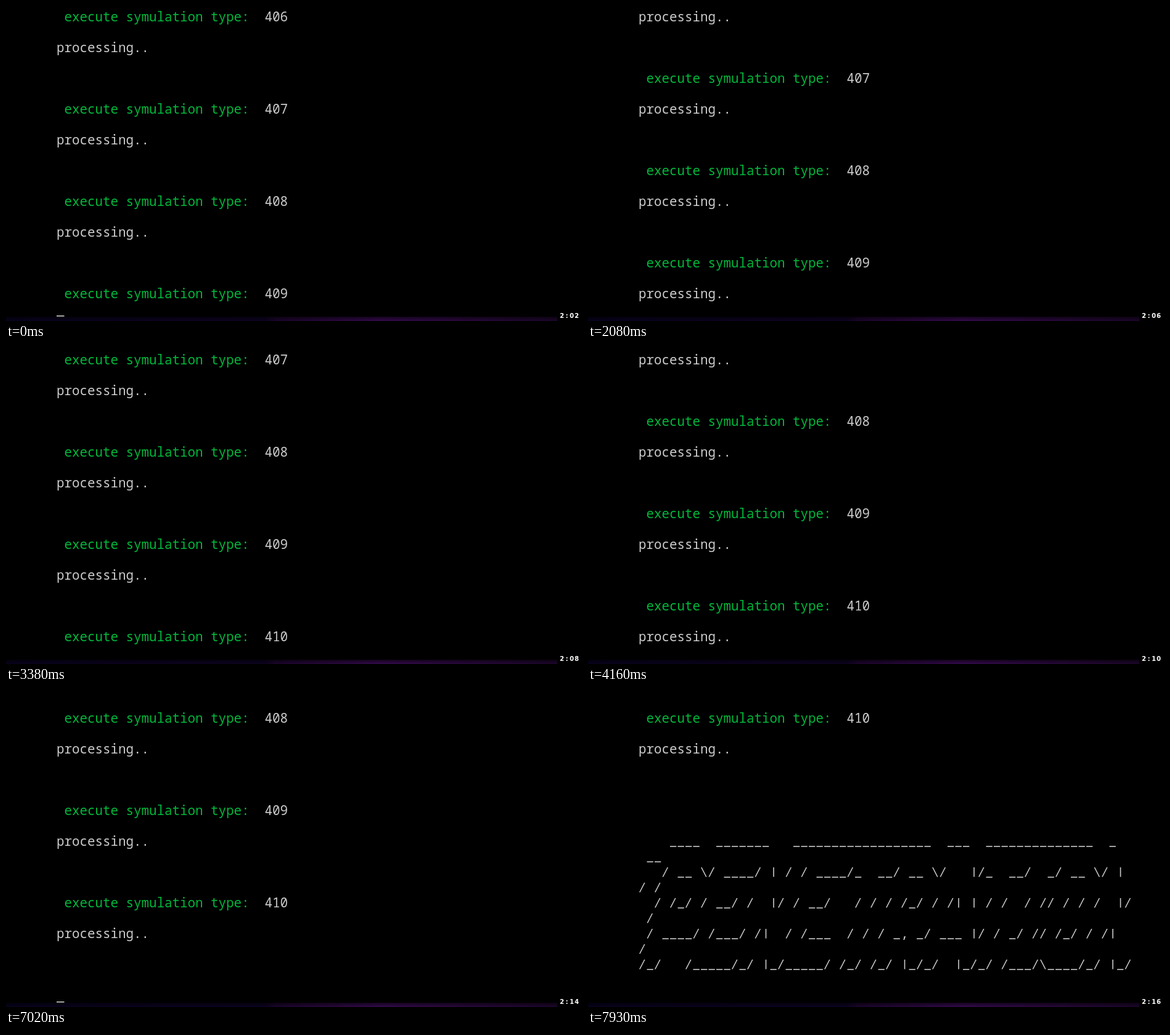
These frames come from a looping animation (934x512 px, 8000 ms). An HTML page with a canvas:

```html
<!DOCTYPE html>
<html lang="en">
<head>
<meta charset="utf-8">
<title>Terminal simulation log</title>
<style>
  html, body { margin: 0; width: 100%; height: 100%; overflow: hidden; background: #000; }
  canvas { display: block; }
</style>
</head>
<body>
<canvas id="stage" width="934" height="512"></canvas>
<script>
const ctx = document.getElementById('stage').getContext('2d');

const LOOP = 8000, STEP = 130;
const LEFT = 82, CELL = 12.5, ROW = 25, COLS = 64, LAST_ROW = 18;
const GRAY = '#cccccc', GREEN = '#00b83c';
const TERM_FONT = '300 20.83px "Noto Sans Mono", "DejaVu Sans Mono", monospace';
const CLOCK_FONT = 'bold 10px "DejaVu Sans", sans-serif';

// [time in ms, lines scrolled so far]
const SCROLLS = [[0, 0], [520, 2], [3120, 6], [3900, 8], [6630, 11], [7540, 23]];
const FIRST_TYPE = 405, LAST_TYPE = 410;
const BANNER_ROW = 32;

const BANNER = [
  String.raw`    ____  _______   __________________  ___  ______________  _   __`,
  String.raw`   / __ \/ ____/ | / / ____/_  __/ __ \/   |/_  __/  _/ __ \/ | / /`,
  String.raw`  / /_/ / __/ /  |/ / __/   / / / /_/ / /| | / /  / // / / /  |/ /`,
  String.raw` / ____/ /___/ /|  / /___  / / / _, _/ ___ |/ / _/ // /_/ / /|  /`,
  String.raw`/_/   /_____/_/ |_/_____/ /_/ /_/ |_/_/  |_/_/ /___/\____/_/ |_/`
];

// Line ends inside a cell, relative to its left edge and baseline
const STROKES = {
  '/': [1.8, 0.5, 9.8, -15],
  '\\': [1.8, -15, 9.8, 0.5],
  '|': [6.5, 0.5, 6.5, -15],
  '_': [1, 1, 11.3, 1]
};

const baseline = row => row * ROW + 25;

function write(text, col, row, color) {
  if (row < 0 || row > LAST_ROW) return;
  ctx.font = TERM_FONT;
  ctx.fillStyle = color;
  [...text].forEach((ch, i) => ctx.fillText(ch, LEFT + (col + i) * CELL, baseline(row)));
}

function drawArt(text, row) {
  if (row < 0 || row > LAST_ROW) return;
  ctx.strokeStyle = GRAY;
  ctx.lineWidth = 1.6;
  [...text].forEach((ch, col) => {
    const s = STROKES[ch];
    if (!s) return write(ch, col, row, GRAY);
    const x = LEFT + col * CELL, y = baseline(row);
    ctx.beginPath();
    ctx.moveTo(x + s[0], y + s[1]);
    ctx.lineTo(x + s[2], y + s[3]);
    ctx.stroke();
  });
}

function drawLog(scroll) {
  for (let n = FIRST_TYPE; n <= LAST_TYPE; n++) {
    const row = LAST_ROW + 6 * (n - 409) - scroll;
    write('execute symulation type:', 1, row, GREEN);
    write(String(n), 27, row, GRAY);
    write('processing..', 0, row + 2, GRAY);
  }
  BANNER.forEach((line, i) => {
    const row = BANNER_ROW + 2 * i - scroll;
    drawArt(line.slice(0, COLS), row);
    drawArt(line.slice(COLS), row + 1);
  });
}

function drawCursor(step) {
  // Output restarts the blink, so its phase shifts while a job runs
  const slip = step >= 4 && step < 41 ? 1 : 0;
  if ((step + slip) % 2) return;
  ctx.fillStyle = GRAY;
  ctx.fillRect(LEFT, 503, 12.5, 1.6);
}

function drawStrip() {
  const glow = ctx.createLinearGradient(0, 0, 894, 0);
  glow.addColorStop(0, '#08021c');
  glow.addColorStop(0.47, '#0d0320');
  glow.addColorStop(0.49, '#1c052c');
  glow.addColorStop(0.68, '#340a4c');
  glow.addColorStop(1, '#1c062a');
  ctx.fillStyle = glow;
  ctx.fillRect(0, 505, 894, 7);
  const fade = ctx.createLinearGradient(0, 505, 0, 512);
  fade.addColorStop(0, 'rgba(0,0,0,.6)');
  fade.addColorStop(1, 'rgba(0,0,0,0)');
  ctx.fillStyle = fade;
  ctx.fillRect(0, 505, 894, 7);
}

function drawClock(t) {
  const sec = Math.floor(2.95 + t * 0.0017 + 1e-6);
  const text = '2:' + String(sec).padStart(2, '0');
  ctx.font = CLOCK_FONT;
  ctx.fillStyle = '#fff';
  ctx.textAlign = 'center';
  [...text].forEach((ch, i) => ctx.fillText(ch, 901.5 + i * 8, 507));
  ctx.textAlign = 'left';
}

function draw(now) {
  const step = Math.floor((now % LOOP) / STEP);
  const t = step * STEP;
  const scroll = SCROLLS.filter(s => s[0] <= t).pop()[1];
  ctx.fillStyle = '#000';
  ctx.fillRect(0, 0, 934, 512);
  drawStrip();
  drawLog(scroll);
  drawCursor(step);
  drawClock(t);
}

const start = performance.now();
function tick() {
  draw(performance.now() - start);
  requestAnimationFrame(tick);
}
tick();
</script>
</body>
</html>
```
